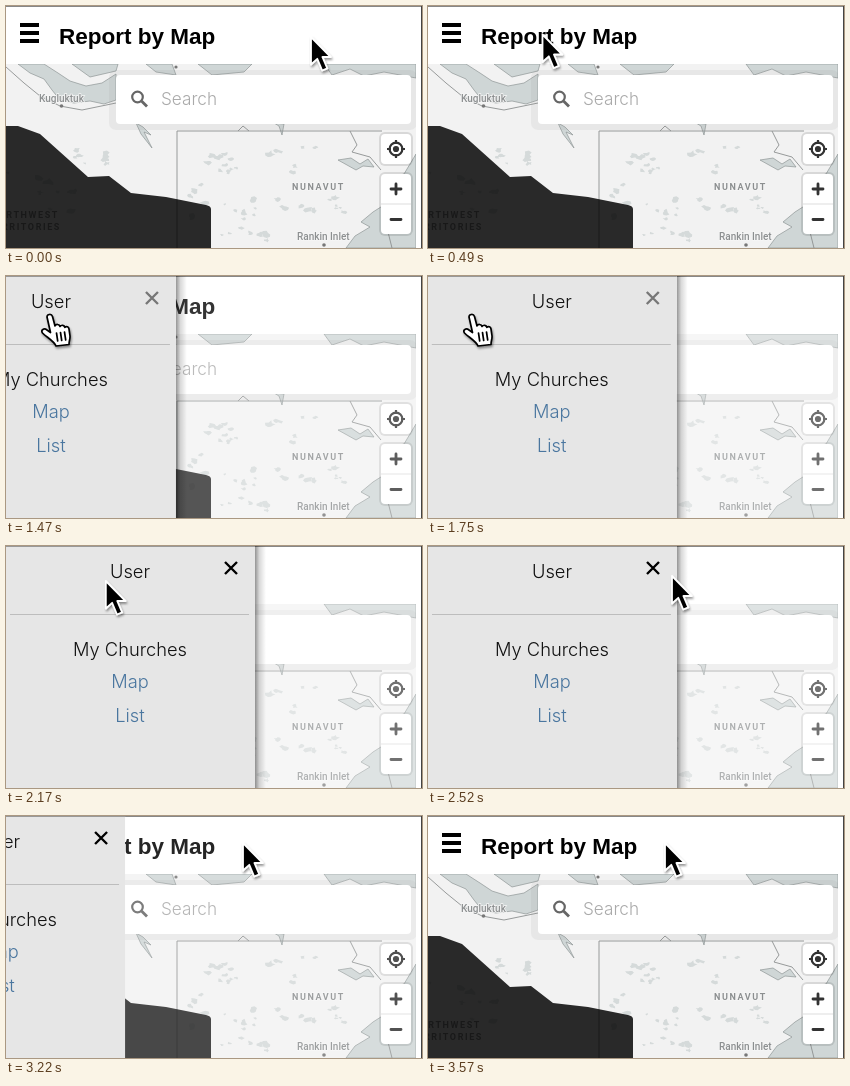
An HTML page for the animation above (4550 ms loop, 416 by 242 pixels).

```html
<!DOCTYPE html>
<html lang="en">
<head>
<meta charset="utf-8">
<title>Report by Map</title>
<style>
  html, body { margin: 0; width: 100%; height: 100%; overflow: hidden; background: #fff; }
  svg { display: block; width: 416px; height: 242px; font-family: "Liberation Sans", Arial, sans-serif; }
  .light { font-family: Inter, sans-serif; font-weight: 300; }
  .label { font: 500 10px Roboto, sans-serif; fill: #8c8f90; stroke: #f6f6f6; stroke-width: 1.5px; paint-order: stroke; }
  .region { font-size: 9px; font-weight: 700; letter-spacing: 1.6px; }
  .water { fill: #cfd6d6; stroke: #8f9595; stroke-width: .7; }
  .border { fill: none; stroke: #8d9090; stroke-width: .9; }
  .card { fill: #fff; }
  .icon { fill: none; stroke: #333; }
  #menu text { font-size: 18.3px; text-anchor: middle; fill: #111; }
  #menu .link { fill: #4a769f; }
</style>
</head>
<body>
<svg viewBox="0 0 416 242">
  <defs>
    <linearGradient id="shade">
      <stop offset="0" stop-color="#000" stop-opacity=".42"/>
      <stop offset=".4" stop-color="#000" stop-opacity=".15"/>
      <stop offset="1" stop-color="#000" stop-opacity="0"/>
    </linearGradient>
    <clipPath id="view"><rect y="58" width="410" height="184"/></clipPath>
    <filter id="drop" x="-50%" y="-50%" width="200%" height="200%">
      <feDropShadow dx="1" dy="2" stdDeviation="1.3" flood-opacity=".4"/>
    </filter>
  </defs>

  <rect width="416" height="242" fill="#fff"/>
  <g clip-path="url(#view)">
    <rect y="58" width="410" height="184" fill="#f2f2f2"/>
    <g class="water">
      <path d="M12 58L24 67L38 73L46 84L54 94L68 97L84 95L98 98L110 94V68L96 77L80 80L64 75L52 67L38 58Z"/>
      <path d="M66 58L84 71L110 65L112 58Z"/>
      <path d="M140 58L150 66L170 69L166 58Z"/>
      <path d="M192 58L206 69L238 66L246 58Z"/>
      <path d="M318 58L326 69L344 63L358 70L378 66L410 72V58Z"/>
      <path d="M130 117L137 121L145 129L138 126L146 142L135 128Z"/>
      <path d="M268 117L273 120L276 129L278 118Z"/>
      <path d="M332 154L345 152L354 158L362 153L368 161L357 160L350 164Z"/>
      <path d="M410 148L398 168L384 172L378 182L378 199L367 206L355 216L364 221L349 230L340 242H410Z"/>
    </g>
    <g id="lakes"></g>
    <path class="border" d="M0 61L18 77L34 90L54 100L76 104L110 97M171 242V125H376M232 125L237 120L243 125M344 125L351 139L346 146L364 151L375 164M378 182L386 204L381 222L386 242"/>
    <circle cx="55.5" cy="100" r="1.8" fill="#777"/>
    <circle cx="170" cy="61" r="1.6" fill="#777"/>
    <circle cx="318" cy="239" r="1.8" fill="#777"/>
    <text class="label" x="33" y="96">Kugluktuk</text>
    <text class="label region" x="286" y="184">NUNAVUT</text>
    <text class="label" x="291" y="234">Rankin Inlet</text>
    <g text-anchor="end">
      <text class="label region" x="53" y="212">NORTHWEST</text>
      <text class="label region" x="55" y="224">TERRITORIES</text>
    </g>
    <path d="M0 120H12L34 128L82 171L103 170L125 187L160 191L200 199Q205 200 205 203V242H0Z" opacity=".83"/>
    <rect x="103" y="64" width="308" height="60" rx="7" fill="#888" opacity=".1"/>
    <rect class="card" x="110" y="69" width="295" height="49" rx="4"/>
    <g fill="none" stroke="#666">
      <circle cx="131.5" cy="91" r="5.3" stroke-width="2.2"/>
      <path d="M135.5 95L141 100.5" stroke-width="2.8"/>
    </g>
    <text class="light" x="155" y="99" font-size="17.2" fill="#aaa">Search</text>
    <rect x="373" y="126" width="34" height="34" rx="6" opacity=".11"/>
    <rect x="373" y="166" width="34" height="64" rx="6" opacity=".11"/>
    <rect class="card" x="375" y="128" width="30" height="30" rx="4"/>
    <rect class="card" x="375" y="168" width="30" height="60" rx="4"/>
    <path d="M375 198H405" stroke="#ddd"/>
    <g class="icon" stroke-width="2.2">
      <circle cx="390" cy="143" r="6.4"/>
      <path d="M390 134V138M390 148V152M381 143H385M395 143H399"/>
      <circle cx="390" cy="143" r="2" fill="#333"/>
    </g>
    <path class="icon" d="M385 183H395M390 178V188M385 213.5H395" stroke-width="2.8" stroke-linecap="round"/>
  </g>
  <path d="M14 19H33M14 27H33M14 35H33" stroke="#000" stroke-width="4"/>
  <text x="53" y="38" font-size="22.5" font-weight="bold">Report by Map</text>
  <rect id="fade" width="416" height="242" fill="#fff" opacity="0"/>
  <path d="M0 .5H416" stroke="#888"/>
  <path d="M415.5 0V242" stroke="#444"/>

  <g id="menu" class="light">
    <rect id="shadow" x="249" width="11" height="242" fill="url(#shade)"/>
    <rect width="249" height="242" fill="#e6e6e6"/>
    <path d="M0 .5H249" stroke="#999"/>
    <path d="M4 68.5H243" stroke="#bdbdbd"/>
    <path id="close" d="M219 16L231 28M231 16L219 28" stroke-width="2.4"/>
    <text x="124" y="32">User</text>
    <text x="124" y="109.5">My Churches</text>
    <text class="link" x="124" y="142">Map</text>
    <text class="link" x="124" y="176">List</text>
  </g>

  <circle id="ring" cx="30.5" cy="28.5" r="64.5" fill="none" stroke="#111" stroke-width="1.3"/>
  <g id="arrow" filter="url(#drop)">
    <path d="M0 0V27.5L6.300 21.8L11.2 33.5L16.3 31.3L11.4 20H19.7Z" stroke="#fff" stroke-width="1.8" stroke-linejoin="round"/>
  </g>
  <g id="hand" filter="url(#drop)" stroke="#000" stroke-width="1.7" stroke-linejoin="round" stroke-linecap="round">
    <path fill="#fff" d="M-2 2C-2-1 2.5-1.5 3.5 1.5L6 11C7 8.8 10.5 9 11 11.5C12.5 9.5 15.3 10 15.8 12.3C17.5 10.8 19.7 12 20 14L21 21C21.3 24 20 25.5 20 29.5L7 31C5 26-2 22.5-6.5 18C-8.5 15-5 12.5-2 15L1.5 17.5Z"/>
    <path fill="none" d="M7.5 18L8.7 26M11.5 17.5L12.7 25.5M15.5 17L16.7 25"/>
  </g>
</svg>
<script>
const LOOP = 4550, STEP = 70, MENU_W = 249, SHADOW_W = 11;
const OPEN_AT = 1270, CLOSE_AT = 3080;
const el = id => document.getElementById(id);
const [menu, shadow, fade, closeX, ring, arrow, hand] =
  ["menu", "shadow", "fade", "close", "ring", "arrow", "hand"].map(el);

// Scattered lakes: [x, y, spread x, spread y, count]
let seed = 11;
const rnd = () => (seed = seed * 16807 % 2147483647) / 2147483647;
const blob = (x, y, r) => {
  const pts = Array.from({ length: 9 }, (_, i) => {
    const a = i * Math.PI * 2 / 9, k = r * (.4 + rnd());
    return (x + Math.cos(a) * k * 1.3).toFixed(1) + " " + (y + Math.sin(a) * k * .9).toFixed(1);
  });
  return "M" + pts.join("L") + "Z";
};
const lakes = [[85, 152, 16, 9, 7], [40, 186, 38, 20, 9], [218, 157, 20, 9, 11],
  [245, 213, 34, 22, 16], [285, 152, 30, 16, 6], [188, 188, 14, 30, 5], [320, 205, 28, 16, 9]];
let d = "";
for (const [x, y, w, h, n] of lakes)
  for (let i = 0; i < n; i++)
    d += blob(x + (rnd() * 2 - 1) * w, y + (rnd() * 2 - 1) * h, 1.2 + rnd() * 2.6);
el("lakes").innerHTML = `<path d="${d}" fill="#d5dada"/>`;

// CSS "ease": cubic-bezier(.25, .1, .25, 1)
function ease(x) {
  if (x <= 0) return 0;
  if (x >= 1) return 1;
  const bez = (a, b, u) => 3 * a * u * (1 - u) ** 2 + 3 * b * u * u * (1 - u) + u ** 3;
  let lo = 0, hi = 1;
  for (let i = 0; i < 24; i++) {
    const mid = (lo + hi) / 2;
    if (bez(.25, .25, mid) < x) lo = mid; else hi = mid;
  }
  return bez(.1, 1, lo);
}

// Pointer tip: [time, x, y]
const path = [[70, 305, 31], [350, 182, 24], [630, 47, 33], [700, 45, 37], [770, 43, 39],
  [1820, 43, 39], [2030, 71, 36], [2100, 71, 36], [2520, 244, 30], [2590, 244, 30],
  [2730, 237, 27], [LOOP, 237, 27]];
function tip(t) {
  const i = path.findIndex(p => p[0] > t);
  if (i < 1) return path[0].slice(1);
  const [a, ax, ay] = path[i - 1], [b, bx, by] = path[i], k = (t - a) / (b - a);
  return [ax + (bx - ax) * k, ay + (by - ay) * k];
}

const show = (node, on) => node.setAttribute("visibility", on ? "visible" : "hidden");
const move = (node, x, y) => node.setAttribute("transform", `translate(${x.toFixed(2)} ${y.toFixed(2)})`);

function draw(t) {
  const open = ease((t - OPEN_AT) / 500) - ease((t - CLOSE_AT) / 460);
  move(menu, open > 0 ? (open - 1) * MENU_W : -MENU_W - SHADOW_W, 0);
  show(shadow, t < CLOSE_AT);
  fade.setAttribute("opacity", .3 * open);
  closeX.setAttribute("stroke", t < 1890 ? "#777" : "#000");
  show(ring, t >= 1050 && t < 1260);
  const pointing = t >= 700 && t < 1890, [x, y] = tip(t);
  show(hand, pointing);
  show(arrow, !pointing);
  move(hand, x, y);
  move(arrow, x, y);
}

const start = performance.now();
function tick() {
  const t = (performance.now() - start) % LOOP;
  draw(Math.floor(t / STEP) * STEP);
  requestAnimationFrame(tick);
}
tick();
</script>
</body>
</html>
```
